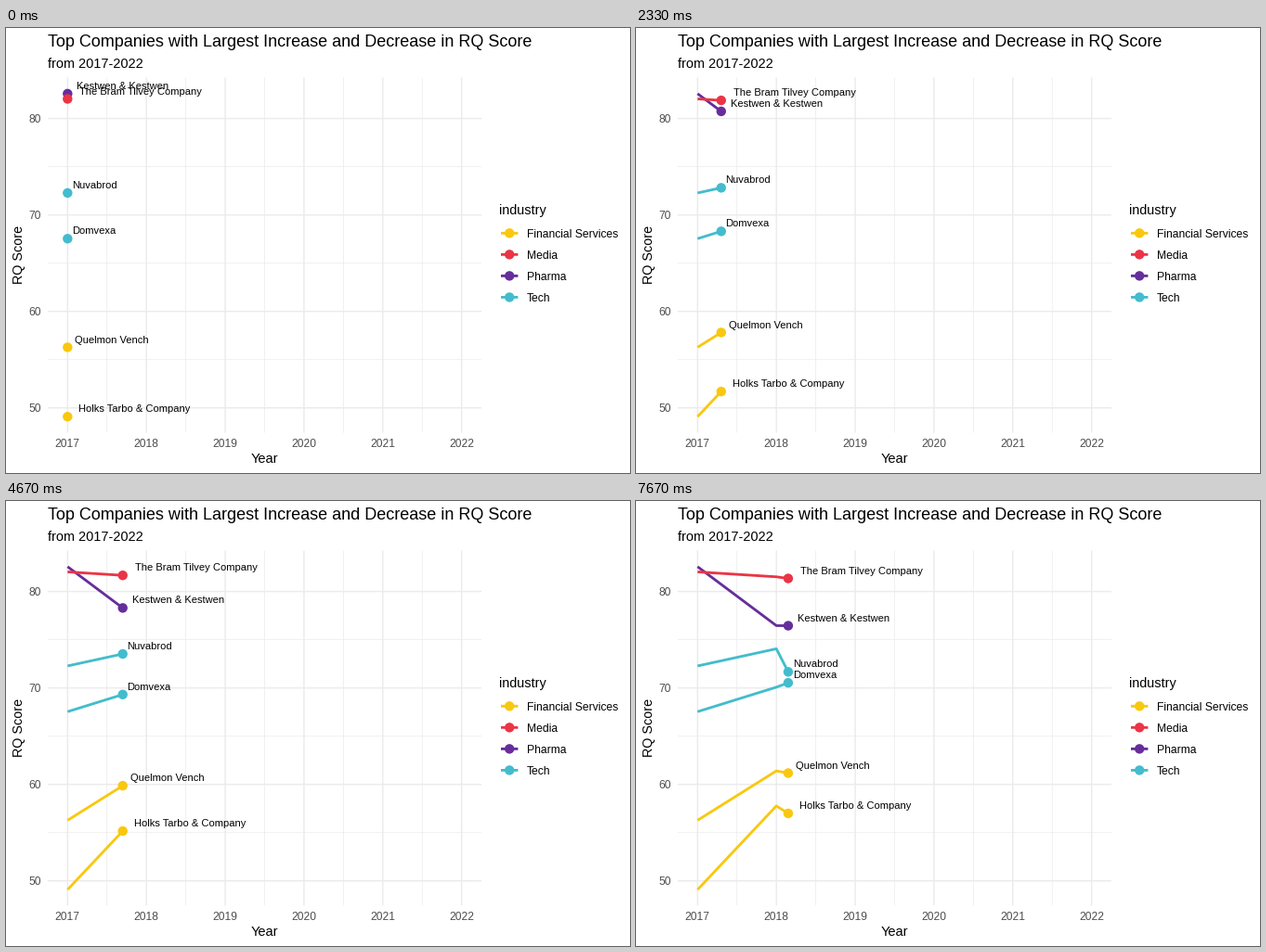
Animation, 672 px wide and 480 px high, one loop 8000 ms. Source, as a matplotlib script:

```python
import matplotlib.pyplot as plt
from matplotlib.animation import FuncAnimation
from matplotlib.patches import Circle
import numpy as np

W, H, DPI = 672, 480, 96
FRAMES, LOOP_MS = 24, 8000
YEARS_PER_FRAME = 0.05
PANEL = (45, 512, 53.5, 436.5)  # left, right, top, bottom

YELLOW, RED, PURPLE, BLUE = "#F9C80E", "#EA3546", "#662E9B", "#43BCCD"
GRID, TICK = "#EBEBEB", "#4D4D4D"
INDUSTRIES = [("Financial Services", YELLOW), ("Media", RED),
              ("Pharma", PURPLE), ("Tech", BLUE)]

# name, colour, scores for 2017, 2018 and 2019
COMPANIES = [
    ("Nuvabrod", BLUE, (72.28, 74.06, 58.1)),
    ("Quelmon Vench", YELLOW, (56.28, 61.40, 59.9)),
    ("Kestwen & Kestwen", PURPLE, (82.57, 76.46, 76.4)),
    ("Domvexa", BLUE, (67.54, 70.08, 73.1)),
    ("The Bram Tilvey Company", RED, (82.03, 81.52, 80.4)),
    ("Holks Tarbo & Company", YELLOW, (49.09, 57.77, 52.6)),
]

plt.rcParams["font.family"] = "Liberation Sans"


def pt(px):
    return px * 72 / DPI


def year_x(year):
    return 66.3 + (year - 2017) * 84.87


def score_y(score):
    return 97.6 + (80 - np.asarray(score)) * 10.405


fig = plt.figure(figsize=(W / DPI, H / DPI), dpi=DPI, facecolor="white")
ax = fig.add_axes([0, 0, 1, 1])
ax.set(xlim=(0, W), ylim=(H, 0))
ax.axis("off")


def text(x, y, s, px, color="black", **kw):
    return ax.text(x, y, s, size=pt(px), color=color, va="baseline",
                   zorder=5, **kw)


def line(xs, ys, color, px, zorder):
    return ax.plot(xs, ys, color=color, lw=pt(px), solid_capstyle="butt",
                   solid_joinstyle="round", snap=False, zorder=zorder)[0]


def dot(x, y, color):
    return ax.add_patch(Circle((x, y), 5.2, fc=color, lw=0, zorder=4))


def draw_panel():
    left, right, top, bottom = PANEL
    for i in range(11):
        x = year_x(2017 + i / 2)
        line([x, x], [top, bottom], GRID, 0.71 if i % 2 else 1.42, 1)
    for score in range(50, 85, 5):
        y = score_y(score)
        line([left, right], [y, y], GRID, 0.71 if score % 10 else 1.42, 1)
    for year in range(2017, 2023):
        text(year_x(year), 452, str(year), 12, TICK, ha="center")
    for score in range(50, 81, 10):
        text(38, score_y(score) + 4.3, str(score), 12, TICK, ha="right")

    text(45, 20, "Top Companies with Largest Increase and Decrease in RQ Score",
         17.97)
    text(45, 43, "from 2017-2022", 14.5)
    text(278.3, 469, "Year", 14.67, ha="center")
    text(18, 244.5, "RQ Score", 14.4, ha="center", rotation=90,
         rotation_mode="anchor")


def draw_legend():
    text(531, 201, "industry", 14.4)
    for i, (name, color) in enumerate(INDUSTRIES):
        y = 221.3 + i * 23.04
        line([533, 551.4], [y, y], color, 2.85, 3)
        dot(542.2, y, color)
        text(561, y + 4.9, name, 12.1)


class Series:
    def __init__(self, name, color, scores):
        self.scores = scores
        self.line = line([], [], color, 2.85, 3)
        self.dot = dot(0, 0, color)
        self.label = text(0, 0, name, 11.15)
        self.gap = 0.1 * self.label.get_window_extent().width

    def reveal(self, elapsed):
        years = [y for y in range(3) if y < elapsed] + [elapsed]
        xs = [year_x(2017 + y) for y in years]
        ys = score_y(np.interp(years, range(3), self.scores))
        self.line.set_data(xs, ys)
        self.dot.center = xs[-1], ys[-1]
        self.label.set_position((xs[-1] + self.gap, ys[-1] - 4.9))


draw_panel()
draw_legend()
series = [Series(*company) for company in COMPANIES]


def update(frame):
    for s in series:
        s.reveal(frame * YEARS_PER_FRAME)
    return []


anim = FuncAnimation(fig, update, frames=FRAMES, interval=LOOP_MS / FRAMES,
                     repeat=True, repeat_delay=0, blit=False)
plt.show()
```
